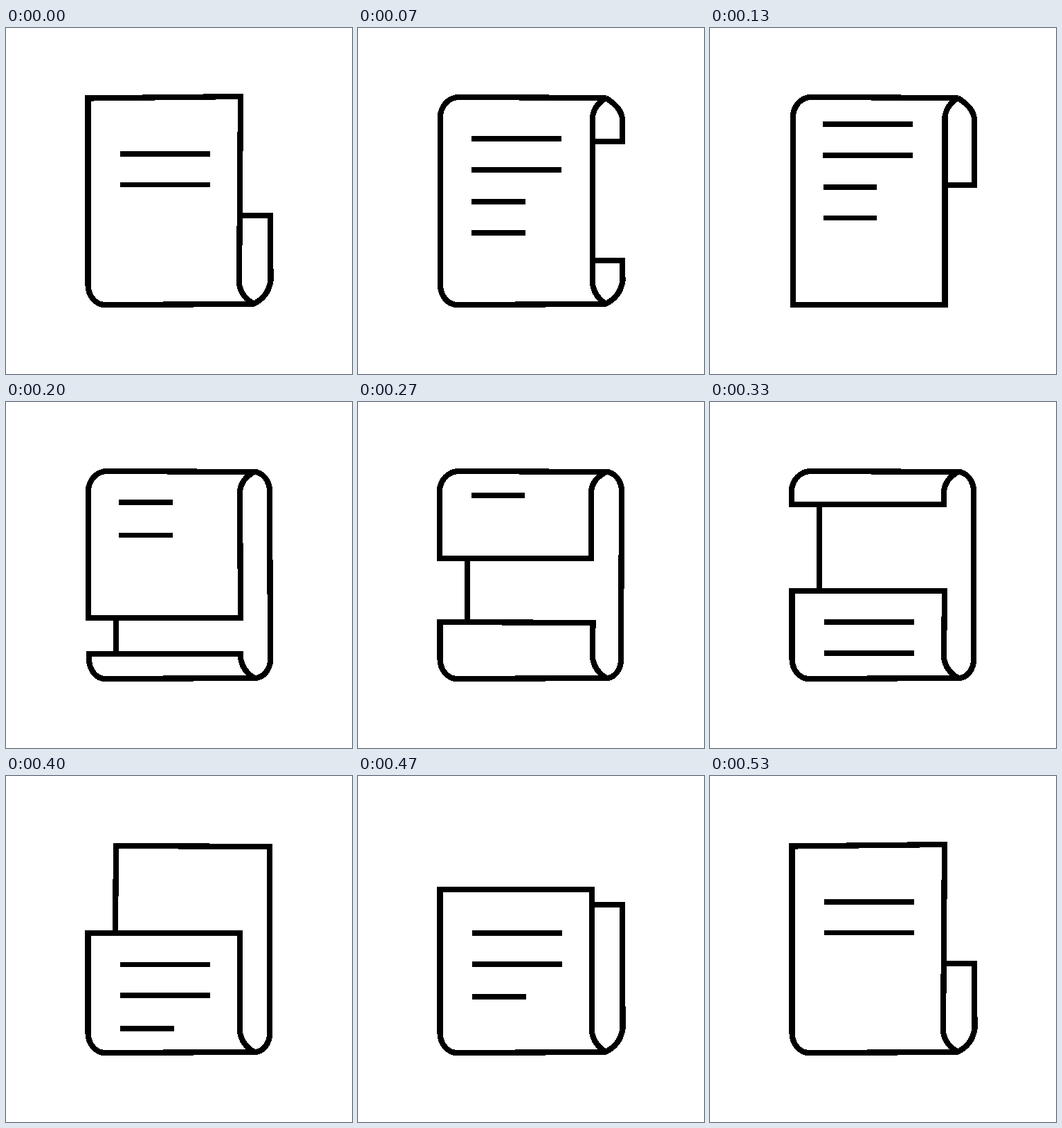
Animation of 500x500 px, one loop 3.01 s. Source, as an HTML page:

```html
<!DOCTYPE html>
<html lang="en">
<head>
<meta charset="utf-8">
<title>Rolling page</title>
<style>
  html, body { margin: 0; width: 100%; height: 100%; overflow: hidden; background: #fff; }
  svg { display: block; width: 100%; height: 100%; }
  path { fill: none; stroke: #000; stroke-miterlimit: 2; shape-rendering: crispEdges; }
  #outline { stroke-width: 8.2; }
  #text { stroke-width: 7.5; }
</style>
</head>
<body>
<svg viewBox="0 0 500 500">
  <path id="outline"/>
  <path id="text"/>
</svg>
<script>
  const LOOP = 3010;
  const ROLL = null;

  // Front panel from x = left to a right side leaning from r1 (top) to r2 (bottom);
  // an end is either a cut edge at y or rolled over.
  function sheet(left, r1, r2, top, bottom, topRight = top) {
    const start = bottom === ROLL
      ? `M359 399L143 400A${143 - left} 29 0 0 1 ${left} 371`
      : `M${r2} ${bottom}H${left}`;
    const upper = top === ROLL
      ? `V129A${146 - left} 29 0 0 1 146 100L359 101Q${r1 + 3} 110 ${r1} 128`
      : `V${top}L${r1} ${topRight}`;
    const end = bottom === ROLL ? `L${r2} 370Q${r2 + 3} 389 359 399Z` : 'Z';
    return start + upper + end;
  }

  // Parts of the back that show beside or between the front panels.
  const topTail = y => `M358 101Q381 115 382 132V${y}H340`;
  const lowTail = y => `M338 ${y}H382L382.5 365Q379 389 357 399`;
  const lowTurn = x => `L${x} 372A${x - 359} 27 0 0 1 359 399`;
  const band = (x1, x2) => `M358 101A${x1 - 358} 28 0 0 1 ${x1} 129` + lowTurn(x2);
  const gap = (x, y1, y2) => `M${x} ${y1}V${y2}`;

  const long = (x, ...ys) => ys.map(y => `M${x} ${y}h130`).join('');
  const short = (x, ...ys) => ys.map(y => `M${x} ${y}h77.5`).join('');

  const rest = {
    outline: sheet(118.5, 339, 337, 101.5, ROLL, 99) + lowTail(271),
    text: long(165, 182, 226.5)
  };

  const steps = [
    { at: 0, ...rest },
    { at: 70,
      outline: sheet(119, 339, 339, ROLL, ROLL) + topTail(164) + lowTail(336),
      text: long(164, 160, 205) + short(164, 251, 296) },
    { at: 130,
      outline: sheet(120, 339.5, 339.5, ROLL, 400) + topTail(227),
      text: long(163, 139, 184) + short(163.5, 230, 274.5) },
    { at: 200,
      outline: sheet(119, 338, 339, ROLL, 312) + sheet(120, 339, 339, 364, ROLL)
        + band(381, 382) + gap(159, 312, 364),
      text: short(163, 145, 192.5) },
    { at: 270,
      outline: sheet(118, 337, 337, ROLL, 226) + sheet(118.5, 339.5, 339, 318, ROLL, 319)
        + band(381, 380) + gap(158, 226, 318),
      text: short(163.5, 135) },
    { at: 330,
      outline: sheet(118, 338, 338, ROLL, 148) + sheet(118.5, 339, 338, 273, ROLL)
        + band(381, 381) + gap(158, 148, 273),
      text: long(165, 318, 363) },
    { at: 400,
      outline: sheet(118.5, 338, 338, 227, ROLL) + 'M158 227L159 101 381 102' + lowTurn(381),
      text: long(164.5, 272.5, 317) + short(165, 365) },
    { at: 470,
      outline: sheet(118.5, 338, 338, 164, ROLL) + lowTail(186),
      text: long(165, 227, 272) + short(165, 319) },
    { at: 530, ...rest }
  ];

  const outline = document.getElementById('outline');
  const text = document.getElementById('text');
  let shown = null;

  function draw(now) {
    const t = now % LOOP;
    const step = steps.findLast(s => s.at <= t) || steps[0];
    if (step !== shown) {
      outline.setAttribute('d', step.outline);
      text.setAttribute('d', step.text);
      shown = step;
    }
  }

  const begin = performance.now();
  function tick() {
    draw(performance.now() - begin);
    requestAnimationFrame(tick);
  }
  tick();
</script>
</body>
</html>
```
